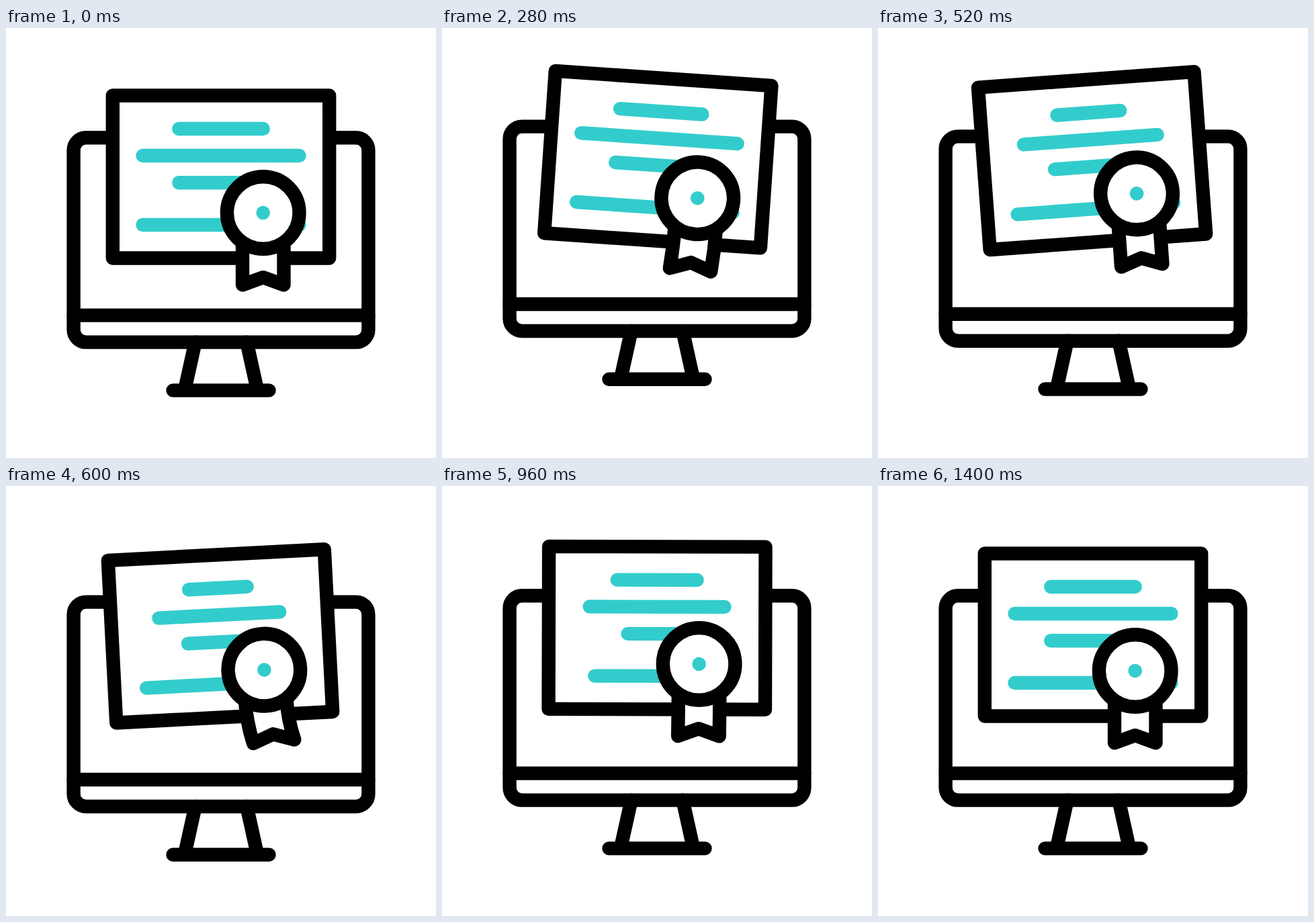
Animation, 640 px wide and 640 px high, one loop 1.68 s. Source, as an HTML page:

```html
<!DOCTYPE html>
<html lang="en">
<head>
<meta charset="utf-8">
<title>Online certificate</title>
<style>
  html, body { margin: 0; width: 100%; height: 100%; overflow: hidden; background: #fff; }
  svg { display: block; width: 100%; height: 100%; }
  .ink { stroke: #000; stroke-width: 20.4; stroke-linecap: round; stroke-linejoin: round; fill: none; }
  .paper { fill: #fff; }
  .teal { stroke: #3cc; stroke-width: 20.4; stroke-linecap: round; }
</style>
</head>
<body>
<svg viewBox="0 0 640 640">
  <g id="monitor" class="ink">
    <rect x="100.6" y="163.3" width="438.8" height="304.3" rx="18.5"/>
    <path d="M100.6 427.6H539.4M281.7 467.6L265.8 539.4M358.3 467.6L374.2 539.4M248.5 539.4H391.5"/>
  </g>
  <g id="card">
    <rect class="ink paper" x="158.8" y="100.5" width="322.4" height="242"/>
    <g id="lines"></g>
    <path id="ribbon" class="ink paper" style="stroke-linecap: butt"/>
    <circle class="ink paper" cx="382.7" cy="275" r="53.8"/>
    <circle cx="382.7" cy="275" r="10.3" fill="#3cc"/>
  </g>
</svg>
<script>
const LOOP = 1680, STEP = 40;
const PIVOT = { x: 320, y: 241 };

// Each track is a list of [ms, value] keys, eased between neighbours.
const monitorY = [[80, 0], [365, -21.2], [640, 11.2], [960, 0]];
const cardY = [[80, 0], [425, -41.9], [678, 14.7], [960, -10.2], [1260, 0]];
const cardTurn = [[80, 0], [280, 3.92], [510, -4.2], [800, 1.3], [1000, 0]];
const ribbonSwing = [[110, 0], [435, -6.5], [640, 10.5], [885, -0.6], [1240, 0]];

const squeeze = (start, peak, end, size) => [[start, 0], [peak, size], [end, 0]];
const rows = [
  { y: 150, half: 62.7, inset: squeeze(205, 668, 1060, 20.5) },
  { y: 190, half: 116.5, inset: squeeze(336, 684, 1250, 31) },
  { y: 230.2, half: 62.7, inset: squeeze(395, 770, 1400, 24.6) },
  { y: 293, half: 116.5, inset: squeeze(525, 885, 1400, 25.5) }
];

const byId = id => document.getElementById(id);
const monitor = byId("monitor"), card = byId("card"), ribbon = byId("ribbon");

for (const row of rows) {
  row.el = document.createElementNS("http://www.w3.org/2000/svg", "line");
  row.el.setAttribute("class", "teal");
  row.el.setAttribute("y1", row.y);
  row.el.setAttribute("y2", row.y);
  byId("lines").append(row.el);
}

const smooth = u => u * u * (3 - 2 * u);

function valueAt(track, t) {
  if (t <= track[0][0]) return track[0][1];
  for (let i = 1; i < track.length; i++) {
    const [t0, a] = track[i - 1], [t1, b] = track[i];
    if (t < t1) return a + (b - a) * smooth((t - t0) / (t1 - t0));
  }
  return track[track.length - 1][1];
}

// The top stays fixed to the badge while the tails bend sideways.
function ribbonPath(s) {
  const left = 352, mid = 382.7, right = 413.5, top = 318, end = 382.3;
  const bend = (top + end) / 2, tilt = s * 0.14;
  return `M${left} ${top}Q${left} ${bend} ${left + s} ${end + tilt}` +
    `L${mid + s * 0.95} 371.2L${right + s} ${end - tilt}Q${right} ${bend} ${right} ${top}`;
}

function draw(t) {
  monitor.setAttribute("transform", `translate(0 ${valueAt(monitorY, t)})`);
  card.setAttribute("transform",
    `translate(0 ${valueAt(cardY, t)}) rotate(${valueAt(cardTurn, t)} ${PIVOT.x} ${PIVOT.y})`);
  ribbon.setAttribute("d", ribbonPath(valueAt(ribbonSwing, t)));
  for (const { el, half, inset } of rows) {
    const reach = half - valueAt(inset, t);
    el.setAttribute("x1", 320 - reach);
    el.setAttribute("x2", 320 + reach);
  }
}

const start = performance.now();
function tick() {
  const t = Math.max(0, performance.now() - start) % LOOP;
  draw(Math.floor(t / STEP) * STEP);
  requestAnimationFrame(tick);
}
tick();
</script>
</body>
</html>
```
